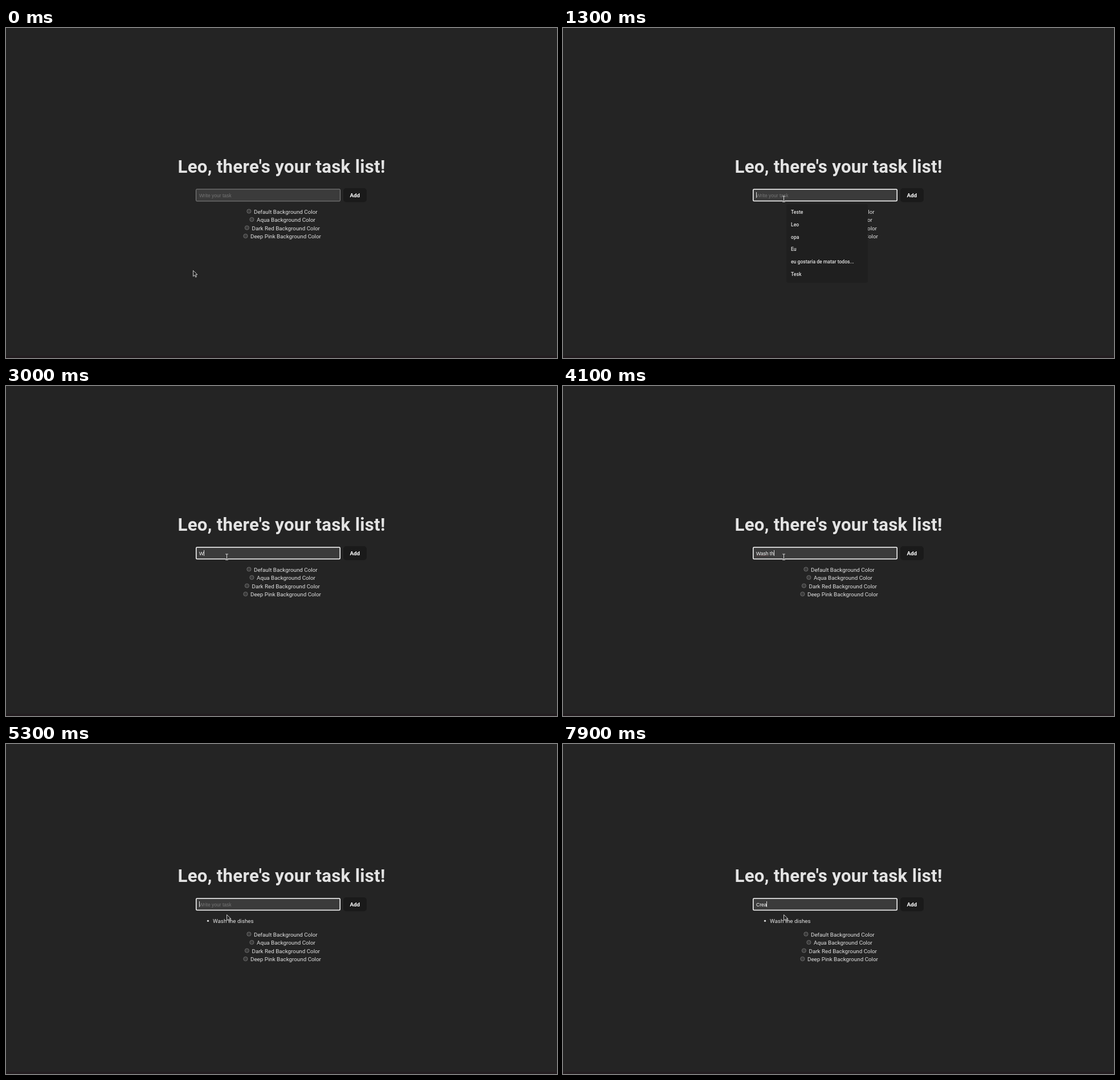
Recreate the animation shown at these times as an HTML page. Size 967 by 579 pixels, loop 8 s.

```html
<!DOCTYPE html>
<html lang="en">
<head>
<meta charset="utf-8">
<title>Task list</title>
<style>
  html, body { margin: 0; width: 100%; height: 100%; overflow: hidden; background: #242424; }
  svg { display: block; width: 967px; height: 579px; }
  text { font: 9.8px Roboto, "Noto Sans", sans-serif; fill: #e3e3e3; white-space: pre; }
  .title { font-size: 31.2px; font-weight: 700; letter-spacing: .3px; text-anchor: middle; }
  .button { font-weight: 700; fill: #fff; text-anchor: middle; }
  .field { font: 8.5px "Liberation Sans", Arial, sans-serif; }
  #menu text { font-size: 8.6px; font-weight: 500; }
</style>
</head>
<body>
<svg viewBox="0 0 967 579">
  <rect width="967" height="579" fill="#242424"/>
  <rect y="575" width="967" height="4" fill="#231d20"/>
  <g id="top">
    <text class="title" x="483.6" y="253.5">Leo, there's your task list!</text>
    <rect id="box" fill="#3b3b3b"/>
    <text id="hint" class="field" x="339" y="296.5" style="fill:#757575">Write your task</text>
    <text id="typed" class="field" x="339" y="296.5" style="fill:#fff"></text>
    <path id="squiggle" fill="none" stroke="#8a3c40" stroke-width=".6" stroke-dasharray="1 1"/>
    <rect id="caret" y="288" width="1" height="10" fill="#ddd"/>
    <rect x="592" y="281" width="41" height="24.5" rx="5" fill="#1a1a1a"/>
    <text class="button" x="612.3" y="296.8">Add</text>
  </g>
  <g id="task">
    <circle cx="354.5" cy="310.3" r="1.6" fill="#e3e3e3"/>
    <text x="363" y="313.5">Wash the dishes</text>
  </g>
  <g id="radios"></g>
  <g id="menu"><rect x="392" y="309" width="143" height="138" rx="4" fill="#1f1f1f"/></g>
  <path id="arrow" d="M.5 .5V10.8L3 8.5 4.8 12.2 6.4 11.5 4.7 7.8H8Z" fill="#222" stroke="#ddd" stroke-width=".9"/>
  <g id="beam" fill="none">
    <path d="M-2.5 -5H2.5M0 -5V5M-2.5 5H2.5" stroke="#222" stroke-width="2.2"/>
    <path d="M-2.5 -5H2.5M0 -5V5M-2.5 5H2.5" stroke="#e0e0e0" stroke-width="1.1"/>
  </g>
</svg>
<script>
const $ = id => document.getElementById(id);
const [head, box, hint, typed, squiggle, caret, task, radios, menu, arrow, beam] =
  ['top', 'box', 'hint', 'typed', 'squiggle', 'caret', 'task', 'radios', 'menu', 'arrow', 'beam'].map($);

const set = (el, attrs) => { for (const k in attrs) el.setAttribute(k, attrs[k]); };
const show = (el, on) => set(el, { visibility: on ? 'visible' : 'hidden' });
const move = (el, x, y) => set(el, { transform: `translate(${x} ${y})` });

[['Default', 435], ['Aqua', 440], ['Dark Red', 431.5], ['Deep Pink', 429]].forEach(([name, x], i) => {
  const y = 321.5 + 14.5 * i;
  radios.innerHTML += `<circle cx="${x - 8.6}" cy="${y}" r="3.6" fill="#3b3b3b" stroke="#858585" stroke-width=".7"/>
    <text x="${x}" y="${y + 4}">${name} Background Color</text>`;
});
['Teste', 'Leo', 'opa', 'Eu', 'eu gostaria de matar todos...', 'Tesk'].forEach((word, i) => {
  menu.innerHTML += `<text x="400" y="${326 + 21.75 * i}">${word}</text>`;
});

// Key times in ms for each typed character
const first = { text: 'Wash the dishes',
  keys: [3000, 3200, 3300, 3400, 3800, 4000, 4100, 4300, 4400, 4600, 4700, 4800, 4900, 5000, 5200] };
const second = { text: 'Crea', keys: [7500, 7700, 7800, 7900] };
const blinks = [[1800, 2400], [5800, 6400], [7000, 7500]];
const FOCUS = 1300, ADD = 5300;

function draw() {
  const t = performance.now() % 8000;
  const added = t >= ADD, focused = t >= FOCUS;

  // The pointer advances in seven steps
  const k = Math.min(Math.max(Math.floor(t / 100) - 2, 0), 7) / 7;
  const ease = k * k * (3 - 2 * k);
  const x = 328 + 59 * ease, y = 425 - 126 * ease;
  const hover = !added && y < 304;
  move(arrow, x, y);
  move(beam, x + .5, y + 1);
  show(arrow, !hover);
  show(beam, hover);

  move(head, 0, added ? -12 : 0);
  move(radios, 0, added ? 12 : 0);
  show(task, added);
  show(menu, focused && t < 3000);

  const line = focused ? 1.5 : 1;
  set(box, { x: 333 + line / 2, y: 282.3 + line / 2, width: 254 - line, height: 22 - line, rx: 1.5,
    stroke: focused ? '#fff' : hover ? '#a5a5a5' : '#858585', 'stroke-width': line });

  const { text, keys } = added ? second : first;
  const count = keys.filter(key => t >= key).length;
  typed.textContent = text.slice(0, count);
  show(hint, !count);
  const end = count ? typed.getSubStringLength(0, count) : 0;
  set(caret, { x: Math.round(339 + end) });
  show(caret, focused && !blinks.some(([a, b]) => t >= a && t < b));

  show(squiggle, !added && t >= 3900);
  set(squiggle, { d: 'M339 297.8H360.5' + (t >= 4400 ? 'M363 297.8H375' : '') });
  requestAnimationFrame(draw);
}
draw();
</script>
</body>
</html>
```
